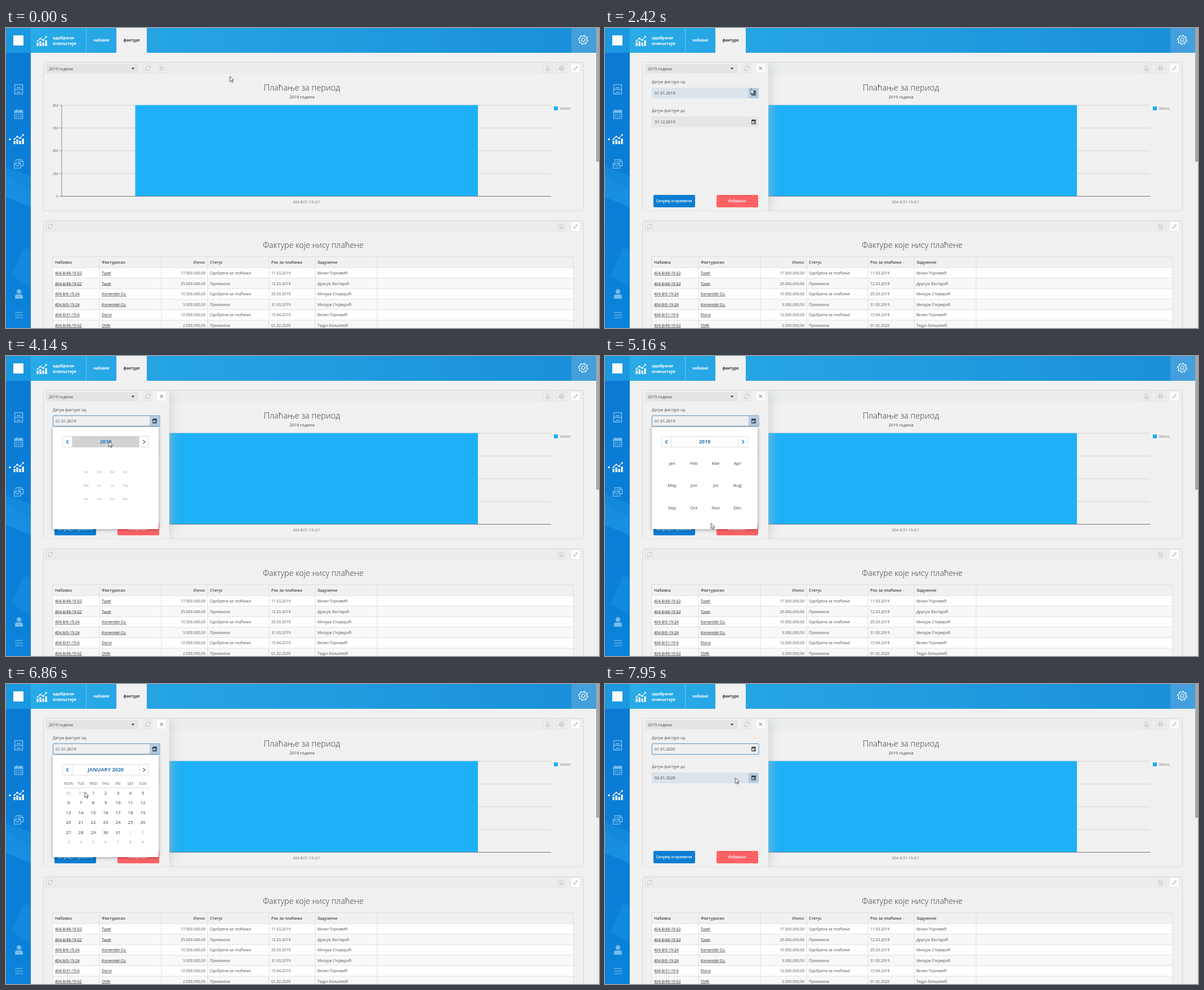
Animation, 1053 px wide and 532 px high, one loop 8 s. Source, as an HTML page:

```html
<!DOCTYPE html>
<html lang="sr">
<head>
<meta charset="utf-8">
<title>Извештаји</title>
<style>
  html, body { margin: 0; width: 100%; height: 100%; overflow: hidden; background: #f1f1f1; }
  body { position: relative; font-family: "Open Sans", "Noto Sans", sans-serif; }
  svg { position: absolute; width: 1053px; height: 532px; overflow: visible; }
  #base, #pointer { left: 0; top: 0; }
  #clip { position: absolute; left: 67px; top: 61px; width: 958px; height: 263px; overflow: hidden; }
  #panel { position: absolute; left: 0; top: 0; width: 223px; height: 263px; box-shadow: 0 0 19px rgba(186,190,192,.85); }
  #inner { position: absolute; inset: 0; overflow: hidden; background: #f0f0f0; }
  #inner svg { left: -67px; top: -61px; }
  .btn { position: absolute; bottom: 6px; width: 74px; height: 22px; border-radius: 2px; color: #fff;
         font: 600 6.6px/22px "Open Sans", "Noto Sans", sans-serif; text-align: center; }
  #save { left: 18.5px; background: #0b7dd3; }
  #drop { left: 130.5px; background: #ff6264; }
  #picker { position: absolute; left: 83px; top: 126px; width: 188px; height: 181px; background: #fff;
            border-radius: 2px; box-shadow: 0 1px 6px rgba(0,0,0,.36); }
  #picker svg { left: -83px; top: -126px; }
  #months, #days20 { transform-origin: 177px 230px; }
  .old { font-variant-numeric: oldstyle-nums tabular-nums; }
</style>
</head>
<body>
<svg id="base"></svg>
<div id="clip"><div id="panel"><div id="inner">
  <svg id="form"></svg>
  <div class="btn" id="save">Сачувај и примени</div>
  <div class="btn" id="drop">Избриши</div>
</div></div></div>
<div id="picker"><svg id="calendar"></svg></div>
<svg id="pointer"><path id="cursor" d="M0 0V9.6L2.2 7.6L3.8 11L5.4 10.3L3.9 7H6.8Z" fill="#fff" stroke="#222" stroke-width=".8"/></svg>

<script>
const $ = id => document.getElementById(id);
const list = (n, fn) => Array.from({ length: n }, (_, i) => fn(i)).join('');

const text = (x, y, s, size = 7.2, fill = '#444', attrs = '') =>
  `<text x="${x}" y="${y}" font-size="${size}" fill="${fill}" ${attrs}>${s}</text>`;
const mid = (x, y, s, size, fill, attrs = '') => text(x, y, s, size, fill, 'text-anchor="middle" ' + attrs);
const bold = 'font-weight="700"', semi = 'font-weight="600"', light = 'font-weight="300"';
const rect = (x, y, w, h, fill, attrs = '') =>
  `<rect x="${x}" y="${y}" width="${w}" height="${h}" fill="${fill}" ${attrs}/>`;
const line = (x1, y1, x2, y2, c, w = 1) => `<path d="M${x1} ${y1}L${x2} ${y2}" stroke="${c}" stroke-width="${w}"/>`;
const at = (x, y, body, attrs = '') => `<g transform="translate(${x} ${y})" ${attrs}>${body}</g>`;
const stroke = (d, c, w = 1) => `<path d="${d}" fill="none" stroke="${c}" stroke-width="${w}"/>`;

// Small toolbar icons, centred on 0,0
const glyphs = {
  refresh: 'M-4 -.6A4 4 0 0 1 3.4 -2.2M4 -4.2V-1.6H1.2M4 .6A4 4 0 0 1 -3.4 2.2M-4 4.2V1.6H-1.2',
  menu: 'M-4 -2.8H4M-4 0H4M-4 2.8H4M-2 -4V-1.6M2 -1.2V1.2M-1 1.6V4',
  doc: 'M-3 -4.2H1.2L3 -2.4V4.2H-3ZM-1.3 -.6L1.3 2.6M1.3 -.6L-1.3 2.6',
  print: 'M-2.4 -1V-4H2.4V-1M-2.4 2.2H-4V-1H4V2.2H2.4M-2.4 1H2.4V4H-2.4Z',
  shrink: 'M4 -4L.8 -.8M.8 -3.4V-.8H3.4M-4 4L-.8 .8M-.8 3.4V.8H-3.4',
  close: 'M-2.6 -2.6L2.6 2.6M2.6 -2.6L-2.6 2.6'
};
const tool = (x, y, kind, lit) => at(x, y,
  rect(-7.5, -7.5, 15, 15, lit ? '#fff' : '#eeefef', `stroke="${lit ? '#f6f6f6' : '#dfe1e1'}"`) +
  stroke(glyphs[kind], lit ? '#a8acac' : '#bbbfbf', kind == 'close' ? 1.6 : 1));

const chartIcon = (x, y, c) => at(x, y,
  [[0, 12], [5, 9.5], [10, 12], [15, 8]].map(([a, b]) => rect(a, b, 3.2, 18 - b, c)).join('') +
  stroke('M1.5 9L6.5 4.5L11.5 7.5L16.8 1.5', c, 1.1) +
  [[1.5, 9], [6.5, 4.5], [11.5, 7.5], [16.8, 1.5]].map(([a, b]) => `<circle cx="${a}" cy="${b}" r="1.5" fill="${c}"/>`).join(''));

const gear = () => {
  let d = '';
  for (let i = 0; i < 32; i++) {
    const a = (i + .5) * Math.PI / 16, r = i % 4 < 2 ? 8.3 : 6.3;
    d += `${i ? 'L' : 'M'}${(r * Math.cos(a)).toFixed(2)} ${(r * Math.sin(a)).toFixed(2)}`;
  }
  return at(1025, 21, `<path d="${d}Z" fill="none" stroke="#fff" stroke-width="1.2" stroke-linejoin="round"/>` +
    '<circle r="3" fill="none" stroke="#fff" stroke-width="1.2"/>');
};

const selectBox = rect(71, 64, 164, 16, '#e3e4e4') + text(76, 74.7, '2019 година') +
  '<path d="M222.6 70.6H228.2L225.4 73.6Z" fill="#333"/>' + tool(251.7, 71.5, 'refresh');

function sidebar() {
  const c = '#79bdec';
  return rect(0, 44, 44, 488, 'url(#side)') +
    '<g fill="#3bb5f5"><path d="M0 245L44 263V318L0 300Z" opacity=".2"/><path d="M0 262L44 288V318L0 300Z" opacity=".1"/>' +
    '<path d="M32 388L44 394V458L10 440Z" opacity=".16"/></g>' +
    rect(0, 0, 44, 44, '#1c98e0') + rect(13, 13, 18, 18, '#fff') +
    stroke('M15.5 100.5H29.5V117H15.5ZM15.5 108.7H29.5M20 104.5V106H25V104.5M20 112.5V114H25V112.5', c, 1.5) +
    stroke('M15.5 146.5H29.5V160.5H15.5ZM18.8 144V147M26.2 144V147', c, 1.5) + rect(15, 146, 15, 4.5, c) +
    list(6, i => rect(18 + i % 3 * 3.6, 152.4 + (i > 2) * 3.6, 2, 2, c)) +
    chartIcon(13.5, 188, '#fff') + '<circle cx="7" cy="197.5" r="1.7" fill="#fff"/>' +
    stroke('M17.5 237V233.5H28V236M21 236.5H30.5V244.5H27M14.5 239.5H26V248.5H14.5ZM14.5 240.5L20.2 244.8L26 240.5', c, 1.4) +
    `<circle cx="23" cy="467.3" r="4" fill="${c}"/><path d="M16 480V476Q16 472.5 20 472.5H26Q30 472.5 30 476V480Z" fill="${c}"/>` +
    [504.5, 509, 513.5].map(y => line(16, y, 30, y, '#5cabe4', 1.8)).join('');
}

function header() {
  return rect(44, 0, 960, 44, 'url(#top)') + rect(1004, 0, 44, 44, '#449fdc') +
    line(142.5, 0, 142.5, 44, '#6cc3ee') + rect(196, 0, 54, 44, '#f1f1f1') +
    chartIcon(54.5, 14, '#fff') +
    text(83, 19.7, 'одабрани', 7.4, '#fff', bold) + text(83, 30.2, 'извештаји', 7.4, '#fff', bold) +
    mid(169.5, 24.4, 'набавке', 6.6, '#fff', bold) + mid(223, 24.4, 'фактуре', 6.6, '#333', bold) + gear() +
    rect(1048, 0, 5, 532, '#ededed') + rect(1048, 0, 5, 237, '#a6a6a6');
}

const card = (y, h) => rect(66.5, y, 959, h, '#f1f1f1', 'rx="3" stroke="#d6d9d9"') + rect(67, y + .5, 958, 21, '#eceeed');

function chart() {
  return card(60.5, 263.5) + selectBox + tool(276.3, 71.5, 'menu') +
    tool(962, 71.5, 'doc') + tool(986.5, 71.5, 'print') + tool(1011.3, 71.5, 'shrink', 1) +
    mid(525.5, 111.3, 'Плаћање за период', 14.6, '#333', light) + mid(525.5, 124.5, '2019 година', 7.5) +
    list(5, i => {
      const y = 137 + i * 40.35;
      return (i < 4 ? line(98.5, y, 968, y, '#d3d3d3') : '') + line(95, y, 99, y, '#888') +
        text(93, y + 2.6, i < 4 ? 8 - i * 2 + 'M' : 0, 6.8, '#767676', 'text-anchor="end"');
    }) +
    rect(229.5, 136.7, 608.5, 161.3, '#1eb0f6') + line(99, 137, 99, 298.5, '#888') + line(98.5, 298.4, 968, 298.4, '#777') +
    mid(534, 311.3, '404-8/31-19-6/1', 6.6, '#767676') +
    rect(973, 139, 7, 7, '#1eb0f6') + text(984, 145, 'Износ', 6.4, '#767676');
}

function table() {
  const cols = [83, 166, 276, 358, 467, 549, 659];
  const heads = ['Набавка', 'Фактурисао', 'Износ', 'Статус', 'Рок за плаћање', 'Задужени'];
  const ok = 'Одобрена за плаћање', got = 'Примљена';
  const rows = [
    ['404-8/48-19-02', 'Tuvel', '17.500.000,00', ok, '11.03.2019', 'Велан Торнавић'],
    ['404-8/48-19-02', 'Tuvel', '25.000.000,00', got, '12.03.2019', 'Драгуљ Вестарић'],
    ['404-8/6-19-24', 'Korvendel Co.', '10.500.000,00', ok, '25.03.2019', 'Милура Стојварић'],
    ['404-8/6-19-24', 'Korvendel Co.', '3.000.000,00', got, '31.03.2019', 'Милура Стојварић'],
    ['404-8/31-19-6', 'Dorul', '12.000.000,00', ok, '15.04.2019', 'Велан Торнавић'],
    ['404-8/48-19-02', 'OVIK', '2.000.000,00', got, '01.02.2020', 'Тадун Белшевић']
  ];
  const cell = (s, i, y, size, fill, attrs) => i == 2
    ? text(354, y, s, size, fill, attrs + ' text-anchor="end"') : text(cols[i] + 4, y, s, size, fill, attrs);
  return card(341.5, 220) + tool(79, 352, 'refresh') + tool(986.5, 352, 'doc') + tool(1011.3, 352, 'shrink', 1) +
    mid(545.5, 390.2, 'Фактуре које нису плаћене', 14.3, '#333', light) +
    rect(83, 405, 925, 20, '#f1f1f1') + heads.map((s, i) => cell(s, i, 417.7, 7, '#444', semi)).join('') +
    rows.map((row, r) => {
      const y = 425 + r * 18.62;
      return rect(83, y, 925, 18.62, r % 2 ? '#f8f8f8' : '#fff') + line(83, y, 1008, y, '#e0e0e0') +
        row.map((s, i) => cell(s, i, y + 11.9, 6.75, i < 2 ? '#222' : '#555',
          'class="old"' + (i < 2 ? ' text-decoration="underline"' : ''))).join('');
    }).join('') +
    cols.concat(1008).map(x => line(x, 405, x, 532, '#dfdfdf')).join('') + line(83, 405.5, 1008, 405.5, '#dfdfdf');
}

const dateIcon = y => stroke(`M260.8 ${y - 3}H267.2V${y + 3.6}H260.8Z`, '#333', 1.1) +
  rect(260.3, y - 3.4, 7.4, 2.2, '#333') + rect(261.6, y - 4.4, 1.2, 2, '#333') + rect(265.2, y - 4.4, 1.2, 2, '#333') +
  rect(264, y + .4, 2, 2, '#333');

const field = (n, y, label, before, after) =>
  text(83, y - 17.2, label, 6.9, '#555') + rect(83, y - 9.5, 190, 19, '#e5e6e6') +
  rect(83, y - 9.5, 190, 19, '#dbe3eb', `id="hover${n}"`) +
  (n == 1 ? rect(83.5, y - 9.5, 189.5, 19, '#f0f0f0', 'id="focus" stroke="#4a8fc9" rx="1"') : '') +
  rect(255, y - 8.5, 17.5, 17.5, '#b2cbe2', `id="press${n}"`) +
  text(88, y + 2.7, before, 7.2, '#444', `id="before${n}"`) + text(88, y + 2.7, after, 7.2, '#444', `id="after${n}"`) + dateIcon(y);

const blue = '#2a75b5';
const title = (id, s) => mid(177, 155.3, s, 9, blue, `${bold} id="${id}"`);

// First day shown is the given day of December
function days(id, first) {
  const names = ['MON', 'TUE', 'WED', 'THU', 'FRI', 'SAT', 'SUN'];
  return `<g id="${id}">` + names.map((s, i) => mid(111 + i * 22, 178.8, s, 6.3, '#888', semi)).join('') +
    line(101, 184.3, 253, 184.3, '#ddd') +
    list(42, i => {
      const n = first + i - 31, day = n < 1 ? n + 31 : n > 31 ? n - 31 : n;
      return mid(111 + i % 7 * 22, 195.8 + Math.floor(i / 7) * 17.45, day, 7.8, n < 1 || n > 31 ? '#b0b0b0' : '#333');
    }) +
    (id == 'days19' ? picked(133) : rect(145.5, 185.5, 19, 15.5, 'none', 'id="dayHover" stroke="#bbb"') + picked(155, 'id="chosen"')) + '</g>';
}
const picked = (x, attrs = '') => `<g ${attrs}>${rect(x - 10, 185.5, 20, 15.5, '#337ab7', 'rx="1"')}${mid(x, 195.8, 1, 7.8, '#fff')}</g>`;

const months = (id, now) => `<g id="${id}">` +
  'Jan Feb Mar Apr May Jun Jul Aug Sep Oct Nov Dec'.split(' ').map((s, i) =>
    mid(119.2 + i % 4 * 38.7, 193 + Math.floor(i / 4) * 39.4, s, 8, i == now ? '#111' : '#444', i == now ? bold : '')).join('') + '</g>';

$('base').innerHTML = `<defs>
  <linearGradient id="top"><stop stop-color="#29abe7"/><stop offset="1" stop-color="#1a90da"/></linearGradient>
  <linearGradient id="side" x2="0" y2="1"><stop stop-color="#0b7bd4"/><stop offset="1" stop-color="#0a82da"/></linearGradient>
  </defs>` + chart() + table() + header() + sidebar();

$('form').innerHTML = selectBox + tool(276.3, 71.5, 'close', 1) +
  field(1, 115.3, 'Датум фактуре од', '01.01.2019', '01.01.2020') +
  field(2, 166.4, 'Датум фактуре до', '31.12.2019', '02.01.2020');

$('calendar').innerHTML =
  '<clipPath id="view"><rect x="99" y="166" width="155" height="134"/></clipPath>' +
  rect(100.5, 142.5, 153, 19, '#fff', 'stroke="#dedede"') +
  rect(118, 142, 119, 20, '#d2d2d2', 'id="titleHover"') + rect(237, 142, 17, 20, '#d8d8d8', 'id="nextHover"') +
  line(117.5, 142, 117.5, 162, '#dedede') + line(236.5, 142, 236.5, 162, '#dedede') +
  stroke('M110.7 149L107.5 152.3L110.7 155.6M243.5 149L246.7 152.3L243.5 155.6', blue, 1.4) +
  title('jan19', 'JANUARY 2019') + title('year19', '2019') + title('year20', '2020') + title('jan20', 'JANUARY 2020') +
  days('days19', 31) + days('days20', 30) +
  rect(100.5, 171.5, 37.5, 38, '#fff', 'id="janHover" stroke="#a8a8a8" rx="1"') +
  '<g id="months"><g clip-path="url(#view)">' + months('m19') + months('m20', 6) + '</g></g>';

// Motion, in milliseconds of the 8 s loop
let css = '';
function anim(id, stops, timing = 'linear') {
  const frames = stops.map(([t, s]) => `${t / 80}%{${s}}`).join('');
  css += `@keyframes ${id}-run{${frames}}#${id}{animation:${id}-run 8s ${timing} infinite}\n`;
}
// Hidden at first, then toggled at each time
const show = (id, ...times) =>
  anim(id, [[0, 'opacity:0'], ...times.map((t, i) => [t, `opacity:${1 - i % 2}`])], 'step-end');

const path = [
  [0, 397.5, 85.5], [460, 397.5, 85.5], [620, 375, 112], [800, 330, 126], [960, 270, 121], [1080, 250, 98],
  [1240, 275, 74], [1400, 277.5, 72.5], [1950, 277.5, 72.5], [2150, 298, 84], [2420, 259, 107.5], [2720, 260, 111],
  [2800, 261, 112], [3120, 261, 112], [3350, 217, 130], [3600, 160, 148], [3900, 182.5, 151.5], [4290, 182.5, 151.5],
  [4500, 128, 186], [4750, 145, 255], [4990, 188, 297], [5160, 188, 297], [5400, 243, 148], [5560, 245, 150],
  [5910, 132, 186], [6060, 116, 188], [6140, 121.5, 190], [6630, 121.5, 190], [7090, 158, 193], [7640, 158, 193],
  [7950, 231.5, 166.5], [8000, 231.5, 166.5]
];
anim('cursor', path.map(([t, x, y]) => [t, `transform:translate(${x}px,${y}px)`]));

anim('panel', [[0, 'height:21px;opacity:0'], [1549, 'height:21px;opacity:0'], [1550, 'height:21px;opacity:1'],
  [1800, 'height:263px;opacity:1'], [8000, 'height:263px;opacity:1']]);
anim('picker', [[0, 'opacity:0'], [3080, 'opacity:0'], [3350, 'opacity:1'], [7640, 'opacity:1'], [7860, 'opacity:0'], [8000, 'opacity:0']]);

const zoom = (id, start, hold, full, end) => {
  const small = 'opacity:.55;transform:scale(.6)', big = 'opacity:1;transform:scale(1)', off = 'opacity:0;transform:scale(.6)';
  const stops = [[0, off], [start - 1, off], [start, small], [hold, small], [full, big]];
  anim(id, end ? [...stops, [end - 1, big], [end, off], [8000, off]] : [...stops, [8000, big]]);
};
zoom('months', 4140, 4290, 4450, 6310);
zoom('days20', 6310, 6630, 6830);

const slide = (id, from, to) => anim(id, [[0, from], [5480, from], [5750, to], [8000, to]].map(([t, x]) => [t, `transform:translateX(${x}px)`]));
slide('m19', 0, -155);
slide('m20', 155, 0);

show('hover1', 2360, 3120);
show('press1', 2360, 7240);
show('focus', 3120);
show('before1', 0, 7240);
show('after1', 7240);
show('before2', 0, 7640);
show('after2', 7640);
show('hover2', 7840);
show('press2', 7840);
show('days19', 0, 4140);
show('jan19', 0, 4140);
show('year19', 4140, 5480);
show('year20', 5480, 6310);
show('jan20', 6310);
show('titleHover', 4140, 4330);
show('nextHover', 5390, 5600);
show('janHover', 4450, 4600, 5900, 6310);
show('dayHover', 7040, 7240);
show('chosen', 7240);

const style = document.createElement('style');
style.textContent = css;
document.head.append(style);
</script>
</body>
</html>
```
